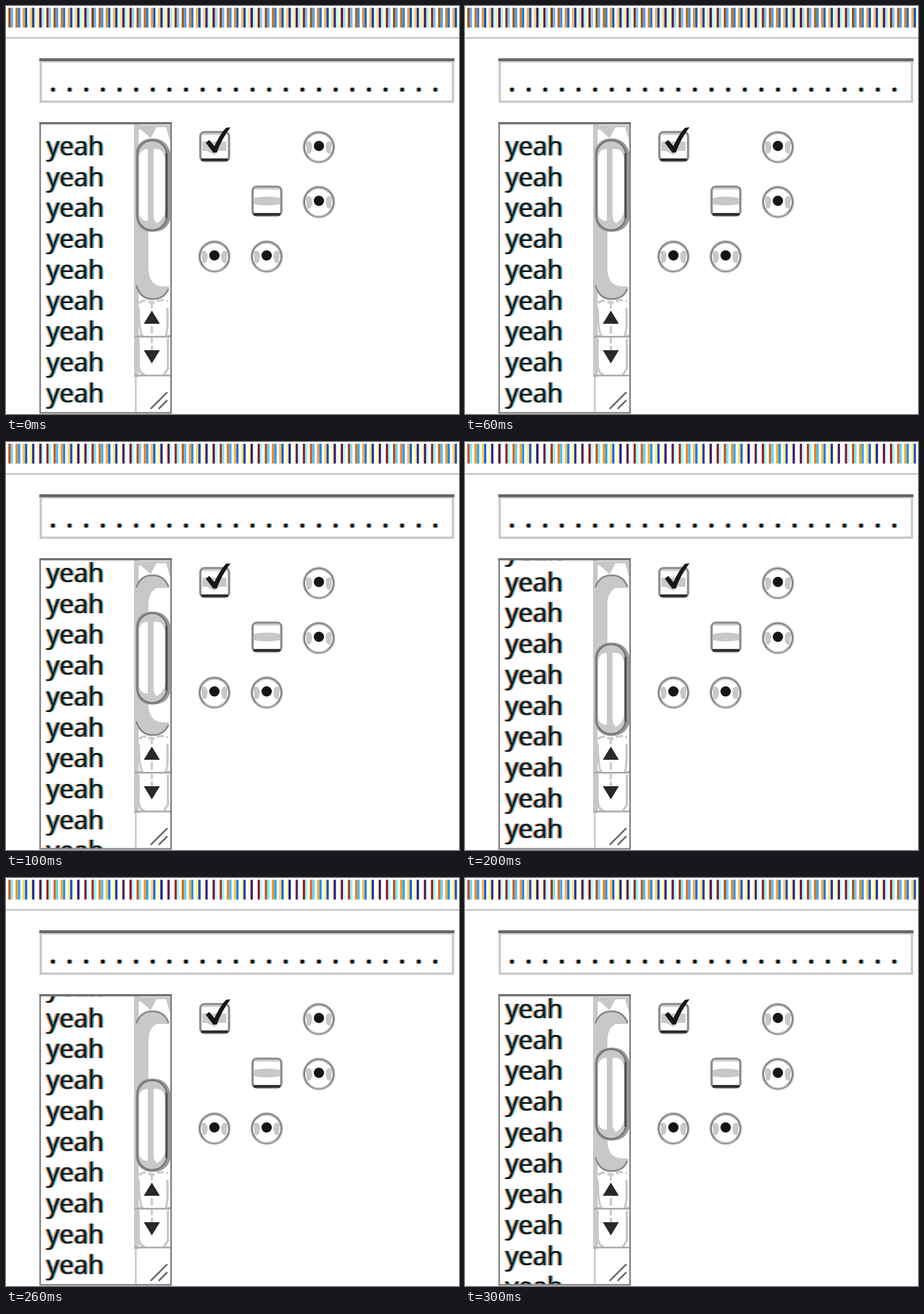
These frames come from a looping animation (789x710 px, 0.4 s). An HTML page:

```html
<!DOCTYPE html>
<html lang="en">
<head>
<meta charset="utf-8">
<title>Form controls</title>
<style>
html, body { margin: 0; width: 100%; height: 100%; overflow: hidden; background: #fff; }
svg { display: block; width: 100vw; height: 100vh; }
text { font: 44.8px "Open Sans", "Noto Sans", sans-serif; }
.line { fill: none; stroke: #888; stroke-width: 3; }
.pale { fill: #c8c8c8; }
.warm { fill: #d99a55; animation: warm .4s step-end infinite; }
.cool { fill: #39a9e3; }
.ink { fill: #151515; }
#rows { animation: scroll .4s step-end infinite; }
#thumb { animation: slide .4s step-end infinite; }
#bars rect { fill: var(--a); animation: tint .4s step-end infinite; }
@keyframes scroll {
  0% { transform: none; }
  25%, 75% { transform: translateY(-16px); }
  50% { transform: translateY(-53.7px); }
}
@keyframes slide {
  0% { transform: none; }
  25%, 75% { transform: translateY(64px); }
  50% { transform: translateY(118px); }
}
@keyframes tint {
  0% { fill: var(--a); }
  25%, 75% { fill: var(--b); }
  50% { fill: var(--c); }
}
@keyframes warm { 0% { fill: #d9a66a; } 25%, 75% { fill: #df8d3e; } 50% { fill: #e47d35; } }
</style>
</head>
<body>
<svg viewBox="0 0 789 710" preserveAspectRatio="none">
  <defs>
    <clipPath id="listClip"><rect x="61" y="206" width="162" height="501"/></clipPath>
    <g id="words"></g>
    <g id="dots"></g>
    <g id="radio">
      <circle r="28.5" class="pale"/>
      <circle r="25.5" fill="#fff" stroke="#858585" stroke-width="3"/>
      <path class="pale" d="M-23-9Q-12-14-12 0T-21 11ZM23-9Q12-14 12 0T21 11Z"/>
      <path d="M-17-16A23 23 0 0 1 17-16M-17 17A23 23 0 0 0 17 17" fill="none" stroke="#c8c8c8" stroke-width="2"/>
      <circle cy="-2" r="9" fill="#151515"/>
    </g>
    <g id="box">
      <rect x="1.5" y="1.5" width="50" height="50" rx="7" fill="#fff" stroke="#8c8c8c" stroke-width="4"/>
      <path d="M6 5H47" stroke="#ccc" stroke-width="3"/>
      <path d="M5 49.5H48" stroke="#292929" stroke-width="4.5" stroke-linecap="round"/>
    </g>
  </defs>

  <g id="bars"></g>
  <path d="M0 55.5H789" stroke="#c8c8c8" stroke-width="3"/>

  <!-- Password field -->
  <path d="M60.5 96V166.5H778.5V96" fill="none" stroke="#c8c8c8" stroke-width="4"/>
  <path d="M58 97H781" stroke="#ccc" stroke-width="3"/>
  <path d="M58 93.5H781" stroke="#666" stroke-width="5"/>
  <use href="#dots" x="-2" class="warm"/>
  <use href="#dots" x="2" class="cool"/>
  <use href="#dots" class="ink"/>

  <!-- List -->
  <g clip-path="url(#listClip)">
    <g id="rows">
      <use href="#words" x="-2.5" class="warm"/>
      <use href="#words" x="2.5" class="cool"/>
      <use href="#words" class="ink"/>
    </g>
  </g>

  <!-- Scrollbar -->
  <rect x="223" y="206" width="8" height="440" class="pale"/>
  <path d="M226 207H286V211H262L252 230L235 215H226ZM279 211H286V236Z" class="pale"/>
  <rect x="226" y="231" width="59" height="280" rx="28" class="pale"/>
  <path d="M285 254H262Q248 262 248 284V455Q248 486 272 488H285Z" fill="#fff"/>
  <path d="M227 253Q234 232 255 232T283 252M227 486Q234 510 255 510T283 492" class="line"/>
  <path d="M232 517Q241 508 254 518Q268 508 282 514M254 513V530M254 557V600" fill="none" stroke="#ccc" stroke-width="4" stroke-dasharray="13 4"/>
  <path d="M231 525Q232 572 239 574H226M281 525Q283 572 277 574H286M231 579V625Q232 640 242 642M282 579V631L275 642" fill="none" stroke="#c8c8c8" stroke-width="4"/>
  <path d="M224 575.5H286M224 643H286" stroke="#aaa" stroke-width="3"/>
  <path d="M226 646V706" stroke="#c8c8c8" stroke-width="3"/>
  <path d="M254 530L268 553H240ZM254 622L268 599H240Z" fill="#292929"/>
  <path d="M252 701L281 672M266 701L281 686" stroke="#666" stroke-width="3"/>
  <g id="thumb">
    <path d="M226 259Q228 231 255 231T287 259V368Q282 393 255 393T226 364Z" fill="#999"/>
    <rect x="229" y="234" width="51" height="156" rx="25" fill="#c8c8c8" stroke="#777" stroke-width="3"/>
    <path d="M232 264Q233 249 247 249V374Q232 374 232 358ZM257 249Q276 246 277 269V356Q276 370 263 378Q257 374 257 363Z" fill="#fff"/>
    <path d="M279.5 256V369" stroke="#4b4b4b" stroke-width="3.5"/>
  </g>
  <rect x="59.5" y="204" width="228" height="504" class="line"/>
  <path d="M58 204H289" stroke="#747474" stroke-width="4"/>

  <!-- Check boxes and radio buttons -->
  <use href="#box" x="337" y="218"/>
  <path d="M342 236H384V252H371L363 259L350 252H342Z" class="pale"/>
  <path d="M348 238L354 233L363 244Q372 224 383 212L391 211Q376 231 367 255H361Z" fill="#171717"/>
  <use href="#box" x="428" y="313"/>
  <path d="M432 334Q454 329 477 334V345Q454 349 432 345Z" class="pale"/>
  <use href="#radio" x="545" y="245.5"/>
  <use href="#radio" x="545" y="341"/>
  <use href="#radio" x="363" y="436"/>
  <use href="#radio" x="454" y="436"/>
</svg>
<script>
const add = (id, tag, attrs, text = "") => {
  const node = document.createElementNS("http://www.w3.org/2000/svg", tag);
  for (const key in attrs) node.setAttribute(key, attrs[key]);
  node.textContent = text;
  document.getElementById(id).append(node);
};

// Enlarged subpixel rendering: each channel is sampled a third of a pixel apart.
const pixel = 4.135, pitch = 3.1765, firstBar = 1.794;
const shade = (column, center, reach, slope) => {
  const channels = [1 / 6, 1 / 2, 5 / 6].map(offset => {
    const dark = (reach - Math.abs(column + offset - center)) * slope;
    return Math.round(255 * (1 - Math.min(.9, Math.max(0, dark))));
  });
  return `rgb(${channels})`;
};
for (let i = 0; i < 60; i++) {
  const center = firstBar + i * pitch, middle = Math.floor(center);
  for (let column = middle - 1; column <= middle + 1; column++) {
    const style = `--a:${shade(column, center, 1.09, .87)};` +
      `--b:${shade(column, center, .85, 1.24)};--c:${shade(column, center, .74, 1.56)}`;
    add("bars", "rect", { x: column * pixel, y: 3, width: pixel, height: 34.5, style });
  }
}
for (let i = 0; i < 24; i++) {
  add("dots", "rect", { x: 79 + i * 28.96, y: 142, width: 5.5, height: 7, rx: 2 });
}
for (let i = 0; i < 10; i++) {
  add("words", "text", { x: 70.5, y: 260 + i * 53.7 }, "yeah");
}
</script>
</body>
</html>
```
